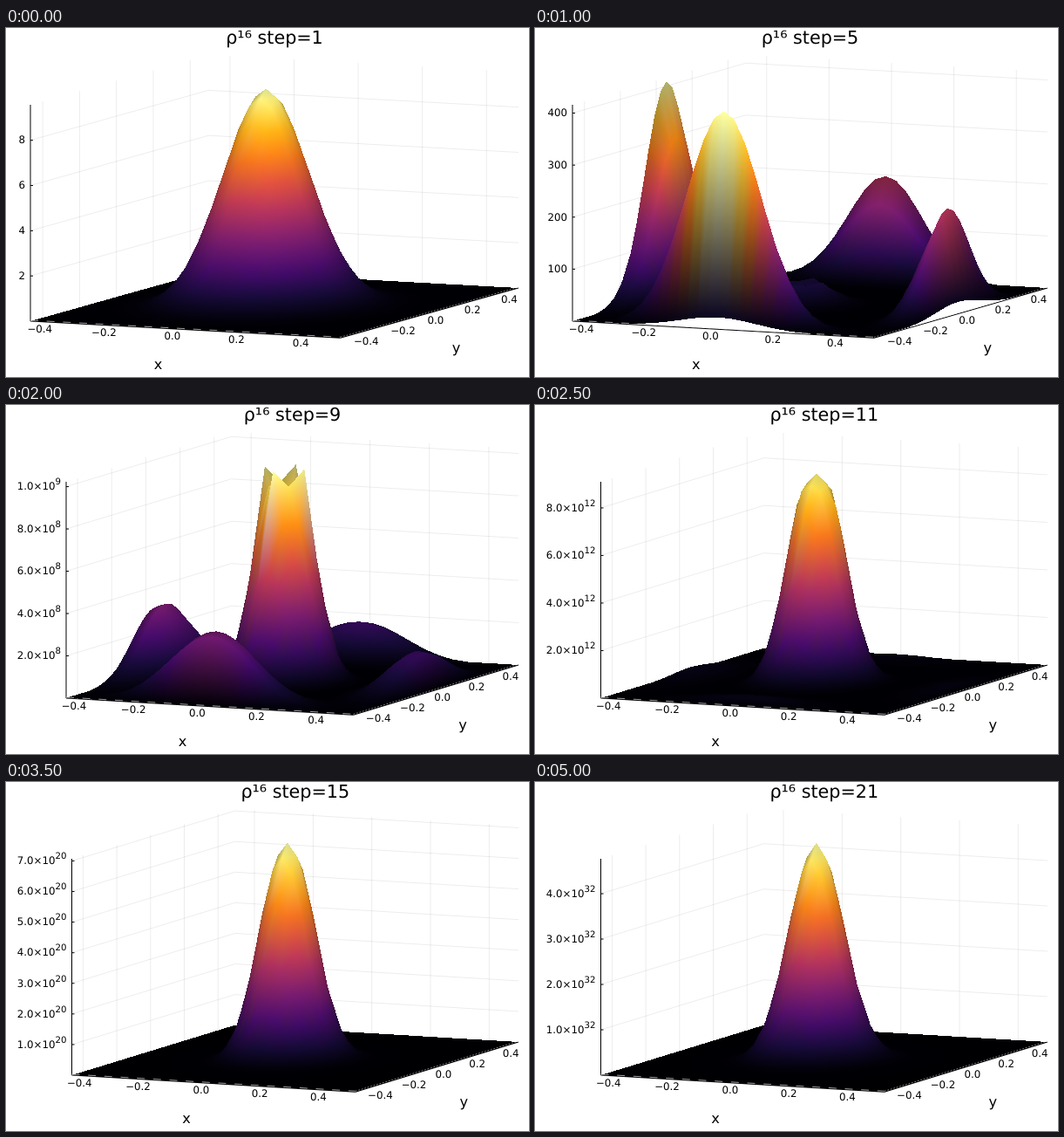
Animation of 600x400 px, one loop 5.05 s. Source, as an HTML page with a canvas:

```html
<!DOCTYPE html>
<html lang="en">
<head>
<meta charset="utf-8">
<title>Density surface by step</title>
<style>
  html, body { margin: 0; width: 100%; height: 100%; overflow: hidden; background: #fff; }
  canvas, svg { position: absolute; left: 0; top: 0; width: 600px; height: 400px; }
  text { font-family: "DejaVu Sans", sans-serif; font-size: 11.8px; fill: #000; text-rendering: geometricPrecision; }
  .title { font-size: 20.7px; text-anchor: middle; }
  .axis { font-size: 16.2px; text-anchor: middle; }
  .end { text-anchor: end; }
  .exp { font-size: 10.2px; }
</style>
</head>
<body>
<canvas id="plot" width="600" height="400"></canvas>
<svg id="labels" viewBox="0 0 600 400"></svg>
<script>
const N = 30, MID = 14, LO = -14 / 30, SPAN = 29 / 30;
const RIGHT = 588, BASE = 336, TALL = 248, DROP = 19.3, RISE = 57.3, SHARE = 0.635;
const TICKS = [-0.4, -0.2, 0, 0.2, 0.4];
const HOLD = 500, LOOP = 5050;

// core: [height, radius in cells, exponent, spike height]
// rim: [near height, far height, spread along the edge, peak cell, inward width, edge height]
const states = [
  { step: 1, left: 28, max: 9.57, unit: 2, core: [1, 5, 2, 0] },
  { step: 3, left: 39, max: 7.8, unit: 2.5, digits: 1, core: [1, 5.4, 2, 0] },
  { step: 5, left: 43, max: 416, unit: 100, core: [0.11, 3.34, 2.62, 1], rim: [1, 0.485, 0.125, 1, 1.3, 0.055] },
  { step: 7, left: 77, max: 3.325e5, unit: 5e4, digits: 2, core: [0.4, 3.4, 2.7, 1], rim: [1, 0.51, 0.13, 1, 2, 0] },
  { step: 9, left: 69, max: 10.23e8, unit: 2e8, digits: 1, core: [0.99, 3.5, 2.8, 1], rim: [0.335, 0.178, 0.145, 1.7, 1.9, 0] },
  { step: 11, left: 75.5, max: 9.1e12, unit: 2e12, digits: 1, core: [1, 3.4, 2.4, 0.25], rim: [0.035, 0.02, 0.145, 1.7, 1.9, 0] },
  { step: 13, left: 75.5, max: 8e16, unit: 2e16, digits: 1, core: [1, 3.4, 2.3, 0] },
  { step: 15, left: 75.5, max: 7.07e20, unit: 1e20, digits: 1, core: [1, 3.4, 2.25, 0] },
  { step: 17, left: 75.5, max: 6.25e24, unit: 1e24, digits: 1, core: [1, 3.42, 2.2, 0] },
  { step: 19, left: 75.5, max: 5.46e28, unit: 1e28, digits: 1, core: [1, 3.45, 2.15, 0] },
  { step: 21, left: 75.5, max: 4.77e32, unit: 1e32, digits: 1, core: [1, 3.47, 2.1, 0] }
];

const ramp = ["000004", "160b39", "420a68", "6a176e", "932667", "bc3754",
  "dd513a", "f37819", "fca50a", "f6d746", "fcffa4"]
  .map(h => [0, 2, 4].map(k => parseInt(h.substr(k, 2), 16)));

function heat(z) {
  const p = Math.min(Math.max(z, 0), 1) * 10, k = Math.min(9, Math.floor(p));
  return ramp[k].map((c, n) => c + (ramp[k + 1][n] - c) * (p - k));
}

const frac = v => (v - LO) / SPAN;

function project(s, a, b, z = 0) {
  const w = RIGHT - s.left;
  return [s.left + w * (SHARE * a + (1 - SHARE) * b), BASE + DROP * a - RISE * b - TALL * z];
}

function coreHeight([height, radius, power, spike], i, j) {
  const x = i - MID, y = j - MID, r = Math.hypot(x, y);
  let z = Math.exp(-Math.pow(r / radius, power));
  const tip = x * y === 0 && r === 2;
  if (tip) z += (1 - z) * spike;
  if (r < 1.1) z *= 1 - 0.14 * spike;
  return height * z;
}

function rimHeight([near, far, spread, peak, width, edge], i, j) {
  const ridge = (d, along, amp) => {
    const inward = d === 0 ? edge / amp : Math.exp(-(((d - peak) / width) ** 2) / 2);
    return amp * inward * Math.exp(-((((along - MID) / 29) / spread) ** 2) / 2);
  };
  return Math.max(ridge(i, j, near), ridge(j, i, near), ridge(29 - i, j, far), ridge(29 - j, i, far));
}

// Points with position and lit colour
function mesh(s) {
  const z = (i, j) => {
    const c = coreHeight(s.core, i, j);
    return s.rim ? Math.max(c, rimHeight(s.rim, i, j)) : c;
  };
  const slope = (f, k) => {
    const lo = Math.max(0, k - 1), hi = Math.min(N - 1, k + 1);
    return (f(hi) - f(lo)) / (hi - lo) * 29 * 0.6;
  };
  return Array.from({ length: N }, (_, j) => Array.from({ length: N }, (_, i) => {
    const h = z(i, j);
    const dx = slope(k => z(k, j), i), dy = slope(k => z(i, k), j);
    const facing = Math.max(0, (-0.45 * dx + 0.78 * dy + 0.43) / Math.hypot(dx, dy, 1));
    const light = 0.7 + 0.3 * Math.min(1, facing * 1.35) + 0.05 * facing ** 8;
    return { p: project(s, i / 29, j / 29, h), c: heat(h).map(v => v * light) };
  }));
}

function fillTriangle(img, A, B, C) {
  const [ax, ay] = A.p, [bx, by] = B.p, [cx, cy] = C.p;
  const area = (bx - ax) * (cy - ay) - (cx - ax) * (by - ay);
  if (Math.abs(area) < 1e-6) return;
  const x0 = Math.floor(Math.min(ax, bx, cx)), x1 = Math.ceil(Math.max(ax, bx, cx));
  const y0 = Math.floor(Math.min(ay, by, cy)), y1 = Math.ceil(Math.max(ay, by, cy));
  for (let y = y0; y < y1; y++) {
    for (let x = x0; x < x1; x++) {
      const px = x + 0.5, py = y + 0.5;
      const u = ((bx - px) * (cy - py) - (cx - px) * (by - py)) / area;
      const v = ((cx - px) * (ay - py) - (ax - px) * (cy - py)) / area;
      const w = 1 - u - v;
      if (u < -1e-6 || v < -1e-6 || w < -1e-6) continue;
      const o = (y * 600 + x) * 4;
      for (let k = 0; k < 3; k++) img.data[o + k] = u * A.c[k] + v * B.c[k] + w * C.c[k];
      img.data[o + 3] = 255;
    }
  }
}

function surface(s) {
  const layer = document.createElement("canvas");
  layer.width = 600;
  layer.height = 400;
  const g = layer.getContext("2d"), img = g.createImageData(600, 400), m = mesh(s);
  // Far cells first
  for (let j = N - 2; j >= 0; j--) {
    for (let i = 0; i < N - 1; i++) {
      fillTriangle(img, m[j][i], m[j + 1][i], m[j + 1][i + 1]);
      fillTriangle(img, m[j][i], m[j][i + 1], m[j + 1][i + 1]);
    }
  }
  g.putImageData(img, 0, 0);
  return layer;
}

function zTicks(s) {
  const out = [];
  for (let k = 1; k * s.unit <= s.max * 1.001; k++) out.push(k * s.unit);
  return out;
}

function zText(s, v) {
  if (s.max < 1e4) return v.toFixed(s.digits || 0);
  const [m, e] = v.toExponential(s.digits).split("e+");
  return `${m}×10<tspan class="exp" dy="-6">${e}</tspan>`;
}

const ctx = document.getElementById("plot").getContext("2d");
const labels = document.getElementById("labels");

function line(color, width, ...pts) {
  ctx.strokeStyle = color;
  ctx.lineWidth = width;
  ctx.beginPath();
  pts.forEach(p => ctx.lineTo(...p));
  ctx.stroke();
}

function drawPlot(s) {
  const at = (a, b, z) => project(s, a, b, z);
  const grid = "rgba(0,0,0,0.075)";
  ctx.clearRect(0, 0, 600, 400);
  for (const t of TICKS) {
    const f = frac(t);
    line(grid, 1, at(f, 1, 0), at(f, 1, 1));
    line(grid, 1, at(0, f, 0), at(0, f, 1));
  }
  for (const v of zTicks(s)) {
    const z = v / s.max;
    line(grid, 1, at(0, 0, z), at(0, 1, z), at(1, 1, z));
  }
  ctx.drawImage(s.layer, 0, 0);

  line("#000", 1, at(0, 0, 1), at(0, 0, 0), at(1, 0, 0), at(1, 1, 0));
  for (const v of zTicks(s)) {
    const [x, y] = at(0, 0, v / s.max);
    line("#000", 1, [x, y], [x + 3, y]);
  }
  // Thin broken gap between floor and axes
  const up = ([x, y]) => [x, y - 1];
  ctx.setLineDash([9, 9.7]);
  line("rgba(255,255,255,0.8)", 0.8, up(at(0, 0, 0)), up(at(1, 0, 0)));
  ctx.setLineDash([1.7, 1.9]);
  line("rgba(255,255,255,0.7)", 0.8, up(at(1, 0, 0)), up(at(1, 1, 0)));
  ctx.setLineDash([]);
}

function labelMarkup(s) {
  const text = (x, y, str, cls = "") => `<text class="${cls}" x="${x}" y="${y}">${str}</text>`;
  const num = t => t.toFixed(1).replace("-", "−");
  const xMid = project(s, 0.5, 0)[0], yMid = project(s, 1, 0.5)[0];
  let out = text((s.left + RIGHT) / 2, 17.7, `ρ¹⁶ step=${s.step}`, "title")
    + text(xMid - 31.2, 391, "x", "axis") + text(yMid + 30.8, 372, "y", "axis");
  for (const t of TICKS) {
    const [ax, ay] = project(s, frac(t), 0), [bx, by] = project(s, 1, frac(t));
    out += text(ax + 0.6, ay + 12.1, num(t), "end") + text(bx + 1.2, by + 11.4, num(t));
  }
  for (const v of zTicks(s)) {
    out += text(s.left - 6, project(s, 0, 0, v / s.max)[1] + 3.8, zText(s, v), "end");
  }
  return out;
}

for (const s of states) {
  s.layer = surface(s);
  s.labels = labelMarkup(s);
}

let shown = -1;
const start = performance.now();

function tick() {
  const t = (performance.now() - start) % LOOP;
  const k = Math.min(states.length - 1, Math.floor(t / HOLD));
  if (k !== shown) {
    shown = k;
    drawPlot(states[k]);
    labels.innerHTML = states[k].labels;
  }
  requestAnimationFrame(tick);
}
tick();
</script>
</body>
</html>
```
